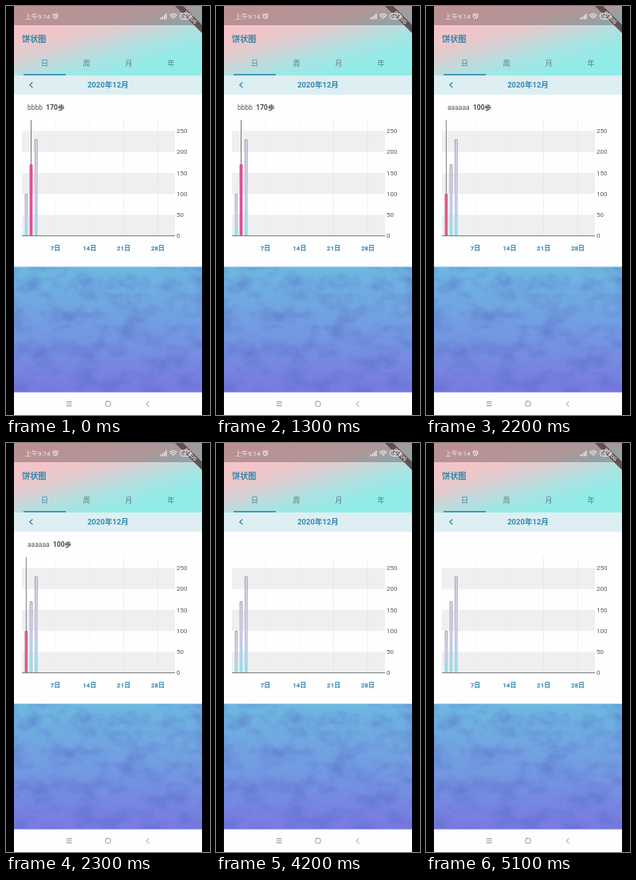
An HTML page for the animation above (6100 ms loop, 256 px wide and 512 px high).

```html
<!DOCTYPE html>
<html lang="zh">
<head>
<meta charset="utf-8">
<title>饼状图</title>
<style>
html, body { margin: 0; width: 100%; height: 100%; overflow: hidden; background: #000; }
svg { display: block; width: 256px; height: 512px; font-family: Roboto, "Noto Sans CJK SC", "Noto Sans CJK", sans-serif; }
.mid { text-anchor: middle; }
.bold { font-weight: 700; }
.blue { fill: #3387ab; }
.tab { font-size: 9px; fill: #66787d; }
.num { font-size: 8px; fill: #55585b; }
.day { font-size: 8px; }
.note { font-size: 8.5px; fill: #58585c; white-space: pre; }
.note .bold { fill: #4b4549; }
.line { fill: none; stroke-linecap: round; stroke-linejoin: round; }
.pick { visibility: hidden; animation: 6100ms step-end infinite; }
#second { animation-name: second; }
#third { animation-name: third; }
#first { animation-name: first; }
@keyframes second { 0% { visibility: visible } 26.2295%, 100% { visibility: hidden } }
@keyframes third { 0% { visibility: hidden } 26.2295% { visibility: visible } 36.0656%, 100% { visibility: hidden } }
@keyframes first { 0% { visibility: hidden } 36.0656% { visibility: visible } 68.8525%, 100% { visibility: hidden } }
</style>
</head>
<body>
<svg viewBox="0 0 256 512">
  <defs>
    <linearGradient id="head" gradientUnits="userSpaceOnUse" x1="0" y1="0" x2="32.5" y2="116">
      <stop offset="0" stop-color="#fcbdc1"/>
      <stop offset=".4" stop-color="#efc6c9"/>
      <stop offset=".54" stop-color="#dfcccf"/>
      <stop offset=".7" stop-color="#bfdbdd"/>
      <stop offset=".82" stop-color="#a6e4e2"/>
      <stop offset="1" stop-color="#91ece8"/>
    </linearGradient>
    <linearGradient id="sea" x2="0" y2="1">
      <stop offset="0" stop-color="#6db8e1"/>
      <stop offset=".5" stop-color="#739be1"/>
      <stop offset="1" stop-color="#7979e0"/>
    </linearGradient>
    <linearGradient id="fill" x2="0" y2="1">
      <stop offset="0" stop-color="#e6dcec"/>
      <stop offset=".55" stop-color="#d2cff0"/>
      <stop offset="1" stop-color="#90e6ef"/>
    </linearGradient>
    <linearGradient id="edge" x2="0" y2="1">
      <stop offset="0" stop-color="#77737f"/>
      <stop offset=".5" stop-color="#aaa6c6"/>
      <stop offset="1" stop-color="#86cfe2"/>
    </linearGradient>
    <filter id="cloud" x="0" y="0" width="100%" height="100%" color-interpolation-filters="sRGB">
      <feTurbulence type="fractalNoise" baseFrequency=".035 .05" numOctaves="5" seed="7"/>
      <feColorMatrix values="0 0 0 0 .32  0 0 0 0 .4  0 0 0 0 .76  2 0 0 0 -.85"/>
    </filter>
    <clipPath id="screen"><rect x="10" width="236" height="512"/></clipPath>
  </defs>

  <rect width="256" height="512"/>
  <g clip-path="url(#screen)">
    <rect x="10" width="236" height="512" fill="#fefefe"/>
    <rect x="10" width="236" height="87" fill="url(#head)"/>
    <rect x="10" width="236" height="24" fill="#000" opacity=".25"/>

    <!-- corner ribbon -->
    <g transform="translate(246 0) rotate(45)">
      <rect x="-25" y="16.8" width="50" height="7.2" fill="#5e4448" opacity=".9"/>
      <text class="mid bold" y="22.6" font-size="6.2" fill="#e6dada">DEBUG</text>
    </g>

    <!-- status bar -->
    <text x="24" y="16" font-size="8" fill="#f4eeee">上午9:14</text>
    <g class="line" stroke="#f4f4f4" stroke-width=".9">
      <circle cx="62" cy="13" r="2.7"/>
      <path d="M62 11.5v1.7l1.2.7M58.6 11l1.7-1.6M65.4 11l-1.7-1.6"/>
      <path d="M194 16v-1M196.3 16v-2.2M198.6 16v-4M200.9 16v-6" stroke-width="1.3"/>
      <path d="M205.5 11.7q4.3-3.8 8.6 0M207 13.4q2.8-2.4 5.6 0M208.7 15q1.1-.9 2.2 0" stroke-width="1.1"/>
      <rect x="218.5" y="9.2" width="13" height="7.2" rx="3"/>
      <path d="M233 12v1.7M225.4 10.6l-1.6 2.4h2.4l-1.6 2.2"/>
    </g>

    <!-- header -->
    <text class="blue bold" x="20" y="44.8" font-size="10.2">饼状图</text>
    <g class="tab mid">
      <text class="blue" x="48.5" y="75.3">日</text>
      <text x="101" y="75.3">周</text>
      <text x="154" y="75.3">月</text>
      <text x="207" y="75.3">年</text>
    </g>
    <rect x="10" y="87" width="236" height="24" fill="#ddeff3"/>
    <rect x="22" y="85" width="53" height="1.8" fill="#3b93b8"/>
    <path class="line" d="M33 95.8l-3.2 3 3.2 3" stroke="#3387ab" stroke-width="1.2"/>
    <text class="blue bold mid" x="128" y="102.4" font-size="9.5">2020年12月</text>

    <!-- chart -->
    <path d="M20 156.5h192v26.3h-192zM20 209h192v26.3h-192zM20 261.5h192v26.3h-192z" fill="#efefef"/>
    <g stroke="#d6e1e6" stroke-width=".7" stroke-dasharray="2 1">
      <path d="M61.8 143v145M104.7 143v145" opacity=".4"/>
      <path d="M147.5 143v145M190.4 143v145"/>
    </g>
    <g class="num">
      <text x="214" y="159">250</text>
      <text x="214" y="185.200">200</text>
      <text x="214" y="211.500">150</text>
      <text x="214" y="237.700">100</text>
      <text x="214" y="264">50</text>
      <text x="214" y="290.200">0</text>
    </g>
    <g class="day blue bold mid">
      <text x="62" y="305.700">7日</text>
      <text x="104.800" y="305.700">14日</text>
      <text x="147.700" y="305.700">21日</text>
      <text x="190.500" y="305.700">28日</text>
    </g>
    <g fill="url(#fill)" stroke="url(#edge)" stroke-width=".7">
      <rect x="24" y="235.400" width="2.800" height="52.300" rx=".8"/>
      <rect x="30.100" y="198.400" width="2.800" height="89.300" rx=".8"/>
      <rect x="36.400" y="167.200" width="2.800" height="120.500" rx=".8"/>
    </g>

    <!-- selected bars -->
    <g id="first" class="pick">
      <path d="M25.400 143v93" stroke="#77777a" stroke-width=".9"/>
      <rect x="23.700" y="235" width="3.400" height="52.700" rx="1" fill="#d95f87"/>
      <text class="note" x="27" y="129.800">aaaaaa  <tspan class="bold">100歩</tspan></text>
    </g>
    <g id="second" class="pick">
      <path d="M31.500 143v56" stroke="#67676a" stroke-width=".9"/>
      <rect x="29.800" y="198" width="3.400" height="89.700" rx="1" fill="#e54d94"/>
      <text class="note" x="27" y="129.800">bbbb  <tspan class="bold">170歩</tspan></text>
    </g>
    <g id="third" class="pick">
      <path d="M37.800 143v25" stroke="#67676a" stroke-width=".9"/>
      <rect x="36.100" y="166.800" width="3.400" height="120.900" rx="1" fill="#e84495"/>
      <text class="note" x="27" y="129.800">ccc  <tspan class="bold">230歩</tspan></text>
    </g>
    <path d="M20 287.700h192" stroke="#707276"/>

    <!-- backdrop -->
    <rect x="10" y="326.400" width="236" height="157.200" fill="url(#sea)"/>
    <rect x="10" y="327" width="236" height="156" filter="url(#cloud)" opacity=".5"/>

    <!-- navigation -->
    <g class="line" stroke="#8b8b8b" stroke-width=".9">
      <path d="M76.200 495.500h6M76.200 498h6M76.200 500.500h6"/>
      <rect x="125" y="495" width="6" height="6" rx="1.500"/>
      <path d="M179.300 495l-3.200 3 3.200 3"/>
    </g>
  </g>
</svg>
</body>
</html>
```
